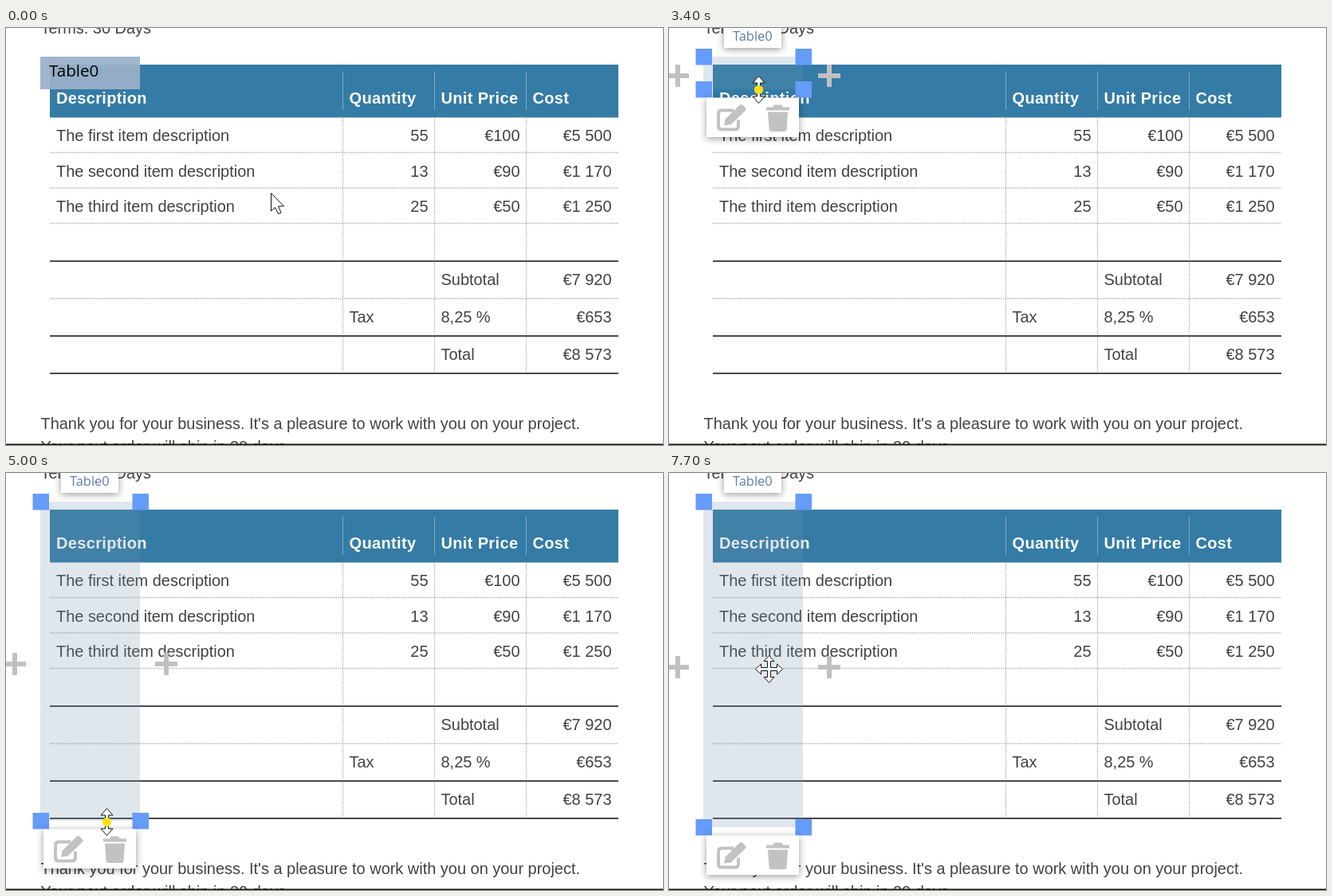
An HTML page for the animation above (8000 ms loop, 824 by 524 pixels).

```html
<!DOCTYPE html>
<html lang="en">
<head>
<meta charset="utf-8">
<title>Table region selection</title>
<style>
  html, body { margin: 0; width: 100%; height: 100%; overflow: hidden; background: #fff; }
  svg { display: block; width: 824px; height: 524px; }
  text { font: 19.95px "Liberation Sans", Arial, sans-serif; fill: #424244; white-space: pre; }
  .head { font-weight: bold; font-size: 20px; letter-spacing: .35px; fill: #fff; }
  .tag { font-family: "Open Sans", sans-serif; }
  .card { fill: #fff; filter: drop-shadow(0 2px 5px rgba(0, 0, 0, .4)); }
  .cursor { fill: #fff; stroke: #111; stroke-linejoin: round; }
  .dotted { stroke: #aaaab0; stroke-width: 1.3; stroke-dasharray: 1.3; }
  .solid { stroke: #4b494e; stroke-width: 2; }
  .divider { stroke: #7fabc6; }
</style>
</head>
<body>
<svg viewBox="0 0 824 524">
  <g id="page"></g>

  <g id="label">
    <rect x="43" y="36" width="125" height="41" fill="#9ab1ca" fill-opacity=".93"/>
    <text class="tag" x="54" y="61" style="font-size:20.6px;fill:#000">Table0</text>
  </g>

  <g id="selection">
    <rect id="area" x="43" y="36" width="125" fill="#6f94a8" fill-opacity=".22"/>
    <g id="handles" fill="#659bf9"></g>
    <path id="pluses" d="M-3 0h28m-14 -14v28M187 0h28m-14 -14v28" stroke="#c0c0c0" stroke-width="6"/>
    <rect class="card" x="69" y="-10" width="72" height="35"/>
    <text class="tag" x="80" y="16" style="font-size:16.4px;fill:#607ba8">Table0</text>
    <g id="toolbar" fill="#c2c2c2">
      <rect class="card" width="116" height="49.5"/>
      <path d="M34 16H19q-4 0-4 4v16q0 4 4 4h17q4 0 4-4v-8" fill="none" stroke="#c2c2c2" stroke-width="4"/>
      <path d="M22 35l1.500-8L42 9q2-1.500 3 0l4 4q1.500 1.500 0 3L30.500 34z"/>
      <path d="M75 12h8l2-3h9l2 3h8v4H75zM77 18h25l-1.500 22q-.5 2.500-2.500 2.500H81q-2 0-2.500-2.500z"/>
    </g>
  </g>

  <g id="pointer">
    <path class="cursor" id="arrow" d="M0 0v22.500l5-4.500l4 8l3.500-1.500l-3.500-8h7z"/>
    <path class="cursor" id="move"/>
    <path class="cursor" id="resize"/>
    <path class="cursor" id="hand" d="M-2.500 18V6q2.500-5 5 0v7q3-1 4 1q3-1 4 1q4 0 4 4v4q0 3-3 6v3H0v-3l-7-8q-1-5 4.500-1.500M2.500 13v5m4-4v5m4-4v4"/>
    <circle id="dot" r="5.6" fill="#f7df18"/>
  </g>
</svg>
<script>
const LOOP = 8000, STEP = 100;
const LEFT = 43, RIGHT = 168, TOP = 36;
const SELECT = 1700, PRESS = 3400, RELEASE = 6400, LAG = 20;
const $ = id => document.getElementById(id);
const range = n => [...Array(n).keys()];

// Page: a description column and three equal columns
const EDGE = 55, PAD = 8;
const col = i => i < 0 ? EDGE : 422.5 + 115 * i;
const text = (x, y, s, cls = "", anchor = "start") =>
  `<text x="${x}" y="${y}" class="${cls}" text-anchor="${anchor}">${s}</text>`;
const inCol = (i, y, s, cls) => text(col(i) + PAD, y, s, cls);
const atEnd = (i, y, s) => text(col(i + 1) - PAD, y, s, "", "end");
const rule = (y, cls) => `<path class="${cls}" d="M${EDGE} ${y}H768"/>`;

function buildPage() {
  const out = [`<rect x="${EDGE}" y="46" width="713" height="66.5" fill="#347ba6"/>`];
  for (const i of range(3)) {
    out.push(`<path class="divider" d="M${col(i)} 55V103"/>`,
      `<path class="dotted" d="M${col(i)} 113V434"/>`,
      rule(156.5 + 44.5 * i, "dotted"));
  }
  for (const i of range(4)) out.push(rule(293 + 47 * i, i === 1 ? "dotted" : "solid"));

  ["Description", "Quantity", "Unit Price", "Cost"]
    .forEach((s, i) => out.push(inCol(i - 1, 95, s, "head")));
  [["first", "55", "€100", "€5 500"], ["second", "13", "€90", "€1 170"], ["third", "25", "€50", "€1 250"]]
    .forEach(([nth, ...cells], row) => {
      const y = 142 + 44.5 * row;
      out.push(inCol(-1, y, `The ${nth} item description`));
      cells.forEach((s, i) => out.push(atEnd(i, y, s)));
    });
  [["Subtotal", "€7 920"], ["8,25 %", "€653"], ["Total", "€8 573"]]
    .forEach(([s, sum], row) => {
      const y = 323 + 47 * row;
      out.push(inCol(1, y, s), atEnd(2, y, sum));
    });
  out.push(inCol(0, 370, "Tax"),
    text(43.5, 7, "Terms: 30 Days"),
    text(43.5, 504, "Thank you for your business. It's a pleasure to work with you on your project."),
    text(43.5, 532.5, "Your next order will ship in 30 days."),
    '<rect y="522.5" width="824" height="1.5" fill="#111"/>');
  $("page").innerHTML = out.join("");
}

// Cursor with one arrowhead per turn around its centre
function star(turns, half, neck) {
  const head = [[-2, -2], [-2, -neck], [-half, -neck], [0, -17], [half, -neck], [2, -neck]];
  const points = range(turns).flatMap(i => {
    const a = i * 2 * Math.PI / turns, c = Math.cos(a), s = Math.sin(a);
    return head.map(([x, y]) => [x * c - y * s, x * s + y * c].map(v => v.toFixed(1)));
  });
  return `M${points.join("L")}Z`;
}

// Pointer: each move eases from the previous place
const home = { x: 332, y: 207, kind: "arrow" };
const moves = [
  { from: 600, to: 1400, x: 112, y: 40, kind: "arrow" },
  { from: 1650, to: 2000, x: 112, y: 57, kind: "move" },
  { from: 2000, to: 2500, x: 112, y: 73, kind: "move" },
  { from: 2650, to: 2900, x: 112, y: 77, kind: "resize" },
  { from: PRESS, to: 5060, x: 126, y: 439, kind: "resize" },
  { from: 5700, to: 6000, x: 126, y: 445, kind: "hand" },
  { from: RELEASE - 50, to: 6600, x: 126, y: 452, kind: "hand" },
  { from: 6750, to: 6800, x: 126, y: 441, kind: "resize" },
  { from: 6810, to: 7700, x: 125, y: 246, kind: "move" }
];
const clamp = (v, lo, hi) => Math.min(hi, Math.max(lo, v));
const smooth = p => p * p * (3 - 2 * p);
const mix = (a, b, p) => a + (b - a) * p;

function pointerAt(t) {
  return moves.filter(m => m.from <= t).reduce((at, m) => {
    const p = smooth(clamp((t - m.from) / (m.to - m.from), 0, 1));
    return { x: mix(at.x, m.x, p), y: mix(at.y, m.y, p), kind: m.kind };
  }, home);
}

// The dragged edge trails the pointer while the button is down
const edgeAt = t => Math.round(pointerAt(clamp(t, PRESS, RELEASE - 100) - LAG).y);

const show = (id, on) => { $(id).style.display = on ? "" : "none"; };
const place = (id, x, y) => $(id).setAttribute("transform", `translate(${x} ${y})`);

function draw(t) {
  const { x, y, kind } = pointerAt(t);
  const bottom = edgeAt(t);

  show("label", t < SELECT);
  show("selection", t >= SELECT);
  $("area").setAttribute("height", bottom - TOP);
  [...$("handles").children].forEach((h, i) => h.setAttribute("y", (i < 2 ? TOP : bottom) - 10));
  place("pluses", 0, Math.round((TOP + bottom) / 2 + 3));
  place("toolbar", 47, bottom + 10.5);

  const overLabel = x < RIGHT && y < 77;
  const shape = kind === "arrow" && overLabel ? "move" : kind;
  for (const id of ["arrow", "move", "resize", "hand"]) show(id, id === shape);
  show("dot", t >= PRESS && t < RELEASE);
  place("pointer", Math.round(x) + .5, Math.round(y) + .5);
}

buildPage();
$("move").setAttribute("d", star(4, 6.5, 10));
$("resize").setAttribute("d", star(2, 7.5, 8.5));
$("handles").innerHTML = [LEFT, RIGHT, LEFT, RIGHT]
  .map(x => `<rect x="${x - 9.5}" width="20.5" height="20.5"/>`).join("");

const start = performance.now();
function tick() {
  const t = (performance.now() - start) % LOOP;
  draw(Math.floor(t / STEP) * STEP);
  requestAnimationFrame(tick);
}
tick();
</script>
</body>
</html>
```
